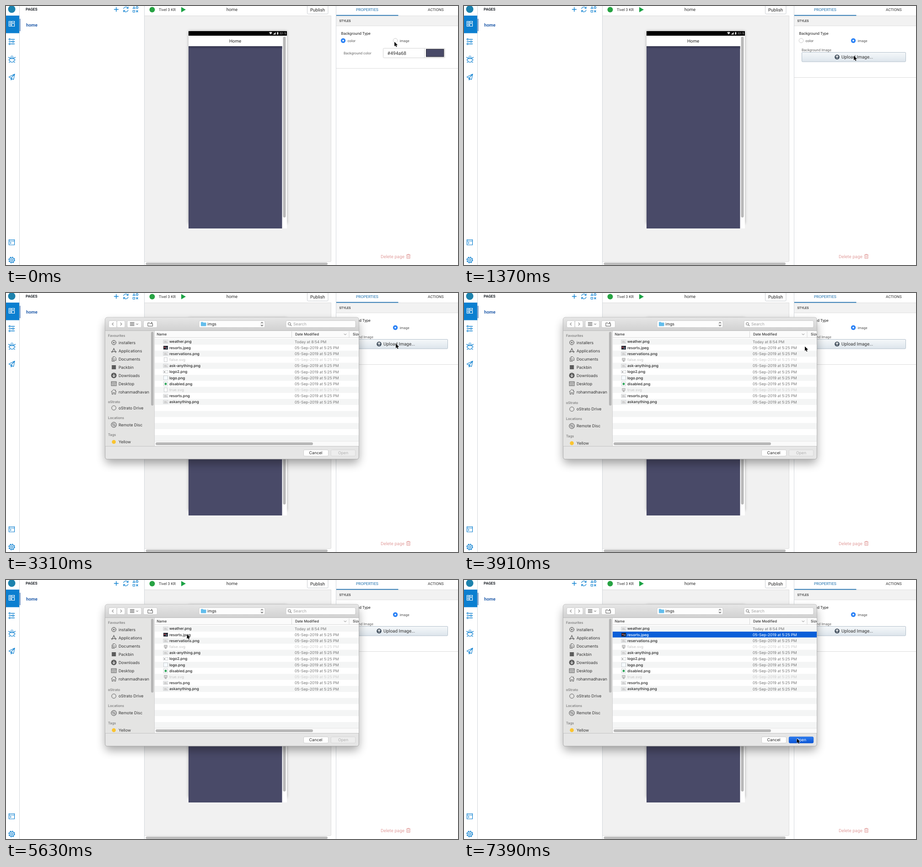
Recreate the animation shown at these times as an HTML page. Size 988 px wide and 567 px high, loop 8 s.

```html
<!DOCTYPE html>
<html lang="en">
<head>
<meta charset="utf-8">
<title>Page background image</title>
<style>
html, body { margin: 0; width: 100%; height: 100%; overflow: hidden; background: #fff; }
svg { display: block; width: 100%; height: 100%; }
text { white-space: pre; text-rendering: geometricPrecision; }
#app { font-family: Roboto, "Open Sans", sans-serif; }
#dialog { font-family: Inter, Roboto, sans-serif; }
</style>
</head>
<body>
<svg id="stage" viewBox="0 0 988 567"></svg>
<script>
const LOOP = 8000;
const BLUE = '#0b7fd0';

// Shape helpers; text takes the vertical centre of its capitals.
const text = (x, cy, s, size, fill, more = '') =>
  `<text x="${x}" y="${cy + size * 0.36}" font-size="${size}" fill="${fill}" ${more}>${s}</text>`;
const box = (x, y, w, h, fill, more = '') =>
  `<rect x="${x}" y="${y}" width="${w}" height="${h}" fill="${fill}" ${more}/>`;
const disc = (x, y, r, fill, more = '') =>
  `<circle cx="${x}" cy="${y}" r="${r}" fill="${fill}" ${more}/>`;
const line = (d, stroke, width = 1, more = '') =>
  `<path d="${d}" fill="none" stroke="${stroke}" stroke-width="${width}" ${more}/>`;
const group = (id, body, more = '') => `<g id="${id}" ${more}>${body}</g>`;
const MID = 'text-anchor="middle"';
const BOLD = 'font-weight="700"';
const MEDIUM = 'font-weight="500"';

const defs = `<defs>
  <filter id="soft" x="-20%" y="-20%" width="140%" height="140%"><feGaussianBlur stdDeviation="3"/></filter>
  <filter id="wide" x="-20%" y="-20%" width="140%" height="150%"><feGaussianBlur stdDeviation="10"/></filter>
  ${[['bar', '#e6e6e6', '#d1d1d1'], ['plain', '#ffffff', '#f3f3f3'], ['hover', '#f5f8fa', '#dde5ec'],
     ['drop', '#33344d', '#494a68'], ['ready', '#4d9bfa', '#1068f5'], ['down', '#2e7df0', '#0a53d4']]
    .map(([id, a, b]) => `<linearGradient id="${id}" x2="0" y2="1">
      <stop stop-color="${a}"/><stop offset="1" stop-color="${b}"/></linearGradient>`).join('')}
  <clipPath id="list"><rect x="325" y="83" width="446" height="252"/></clipPath>
  <clipPath id="side"><rect x="217" y="83" width="108" height="252"/></clipPath>
</defs>`;

function sidebar() {
  return box(0, 0, 988, 567, '#fff')
    + line('M29.5 0V567M302.5 0V567', '#d3d8dc')
    + disc(12.5, 7, 8, '#1c82ad')
    + box(0, 21, 29, 38.5, BLUE)
    + line('M6.5 33.5h4v11h-4zM12.5 33.5h6v3h-6zM12.5 38.5h6v6h-6zM6.5 37h4M6.5 41h4', '#fff', 1.2)
    + line('M11 73h8M6 78h7.5M17.5 78h1.5M11 83h8', BLUE, 1.3)
    + [[8, 73], [15.5, 78], [8, 83]].map(([x, y]) => disc(x, y, 1.7, 'none', `stroke="${BLUE}" stroke-width="1.2"`)).join('')
    + disc(13, 118, 5.2, 'none', `stroke="${BLUE}" stroke-width="1.2"`)
    + line('M8 113q5 5 10 0M5 112l3 2M21 112l-3 2M5 118h2.5M18.5 118H21M6.5 124l2.5-2M19.5 124l-2.5-2M10 111q3-3 6 0', BLUE, 1.1)
    + line('M6 155.5 19 149 16.5 161 11 158 19 149M6 155.5 11 158v4l2.4-2.7', BLUE, 1.2, 'stroke-linejoin="round"')
    + line('M6.5 511.5h12v11.5h-12zM6.5 514.5h12M9 517l2 1.7-2 1.7', BLUE, 1.2)
    + disc(12.5, 556, 2.3, 'none', `stroke="${BLUE}" stroke-width="1.2"`)
    + disc(12.5, 556, 5.3, 'none', `stroke="${BLUE}" stroke-width="1.2"`)
    + disc(12.5, 556, 6.4, 'none', `stroke="${BLUE}" stroke-width="1.5" stroke-dasharray="2.5 2.53"`)
    + text(43, 7.5, 'PAGES', 8.3, '#20252b', BOLD)
    + box(30, 28, 1.3, 27, '#2a62ad')
    + text(44, 41.8, 'home', 9.8, '#2a62ad', BOLD)
    + line('M241 2.5v10M236 7.5h10', BLUE, 1.4)
    + line('M257 6.5a5.2 5.2 0 0 1 9.6-1.8M267 8.5a5.2 5.2 0 0 1-9.6 1.8M267 1.5v3.6h-3.6M257 13.5V9.900h3.6', BLUE, 1.2)
    + line('M277.500 5.500l2.300-4 2.300 4zM277.500 9.500h4v4h-4zM284.500 9.500l4 4M288.500 9.500l-4 4', BLUE, 1.1)
    + disc(286.5, 3.500, 2.1, 'none', `stroke="${BLUE}" stroke-width="1.1"`);
}

function canvasArea() {
  return box(303, 21, 407, 538, '#f1f1f1')
    + line('M303 21.500H710M710.500 21V559M303 559.500H710', '#dcdcdc')
    + box(305.5, 561.5, 397.5, 5.5, '#bdbdbd', 'rx="2.7"')
    + disc(319.5, 8, 6, '#27a343')
    + text(334, 7.5, 'Tivel 3 KR', 8.4, '#333')
    + '<path d="M383 2.200 393 8 383 13.800z" fill="#1ca345"/>'
    + text(494, 8, 'home', 9.7, '#333', MID)
    + box(658.5, -5, 45.5, 22.5, '#fff', 'rx="2" stroke="#c9cdd1"')
    + text(681, 8, 'Publish', 9.75, '#222', MID)
    + box(399, 55, 215, 421, '#000', 'opacity=".28" filter="url(#soft)"')
    + box(399, 65, 215, 422, '#fff')
    + box(399, 55, 215, 10, '#000')
    + box(399, 88, 204.500, 399, '#494a68')
    + box(399, 88, 204.500, 6, 'url(#drop)')
    + box(605.500, 67, 6, 396, '#b8b8b8', 'rx="3"')
    + text(501, 76.5, 'Home', 9.7, '#222', MID)
    + '<path d="M575 58q3.500-2.600 7 0l-3.500 4.500zM589.500 57v5.500h-6zM592.300 57.500h.8v-.8h1.400v.8h.8v5h-3z" fill="#ddd"/>'
    + text(598, 60, '22:5', 6, '#eee', 'font-family="DejaVu Sans Mono, monospace"');
}

const radio = (x, on) => on
  ? disc(x, 75.7, 5.2, '#2b82f6') + disc(x, 75.7, 1.8, '#fff')
  : disc(x, 75.7, 4.8, '#fff', 'stroke="#c4c4c4" stroke-width=".9"');

function properties() {
  const colorForm = radio(737, true) + radio(851, false)
    + text(738, 102.800, 'Background color', 7.75, '#666')
    + box(824.500, 92.500, 135, 21, '#fff', 'rx="2" stroke="#d2d2d2"')
    + line('M914.500 93v20', '#d8d8d8')
    + text(833.5, 102.8, '#494a68', 10.45, '#333')
    + box(918.500, 94.500, 38.500, 16.500, '#494a68', 'stroke="#2a2a35"')
    + line('M722 136.500H988', '#dcdcdc');
  const imageForm = radio(737, false) + radio(851, true)
    + text(738, 96.500, 'Background Image', 7.77, '#666')
    + box(738.500, 101.500, 227, 20.500, 'url(#plain)', 'id="upload" rx="1.5" stroke="#cfd3d6"')
    + disc(815.5, 111.700, 5.400, '#4b5866')
    + line('M815.500 114.900v-6M812.900 111.200l2.600-2.600 2.600 2.600', '#fff', 1.3)
    + text(825, 111.800, 'Upload Image...', 9.93, '#333')
    + line('M722 156.500H988', '#dcdcdc');
  return line('M721.500 0V567', '#d3d8dc')
    + box(722, 22, 266, 21.500, '#f2f2f2')
    + line('M722 21.500H988M722 43.500H988', '#e0e0e0')
    + box(722, 19.700, 135.500, 1.700, '#1b6fae')
    + text(765, 7.500, 'PROPERTIES', 8.5, '#1b6fae')
    + text(922, 7.500, 'ACTIONS', 8.4, '#333')
    + text(728.500, 32.500, 'STYLES', 7.1, '#333', MEDIUM)
    + text(732.500, 60.300, 'Background Type', 8.4, '#222')
    + text(746.500, 75.900, 'color', 7.8, '#555')
    + text(860.500, 75.900, 'image', 7.7, '#555')
    + text(819, 548.300, 'Delete page', 9.9, '#e2a09f')
    + line('M875 545h9M877.500 545v-1.500h4v1.500M876 545v7.500h7v-7.500M878.200 547v4M880.800 547v4', '#de9290', .9)
    + group('colorForm', colorForm) + group('imageForm', imageForm);
}

const DARK = '#5c5c5c';
const places = [
  ['installers', disc(0, 0, 4.2, 'none', `stroke="${DARK}"`) + disc(0, 0, 5.300, 'none', `stroke="${DARK}" stroke-dasharray="1.200 1.200"`) + disc(0, 0, 1.500, DARK)],
  ['Applications', line('M-4.500 4.500 0-5 4.500 4.500M-6 1.800H6', DARK, 1.2)],
  ['Documents', line('M-4-3v8h6M-1.800-5H2l3 3v5h-6.800zM0 0h3', DARK)],
  ['Packbin', box(-4.5, -4.5, 9, 9, DARK)],
  ['Downloads', disc(0, 0, 6, DARK) + line('M0-3.500v6M-2.700 0 0 2.900 2.700 0', '#e4e4e4', 1.3)],
  ['Desktop', box(-5.5, -4.5, 11, 9, 'none', `stroke="${DARK}"`) + line('M-5.500-2.500h11M-4 2.500h8M-4.500 0h9', DARK, .9)],
  ['rohanmadhavan', line('M-6 0 0-5.500 6 0M-4-1v6.200h2.500V1.500h3v3.700H4V-1M3.500-2.500v-2.500', DARK)],
];
const place = ([name, icon], y) => `<g transform="translate(235.700 ${y})">${icon}</g>` + text(246, y, name, 8.8, '#333');
const heading = (y, s) => text(223, y, s, 7.55, '#777', MEDIUM);

function sidePane() {
  const lower = heading(238, 'oStrato')
    + place(['oStrato Drive', disc(0, 0, 4.800, 'none', `stroke="${DARK}"`)], 251.500)
    + heading(273, 'Locations')
    + place(['Remote Disc', disc(0, 0, 5.800, '#c9c9c9', `stroke="${DARK}"`) + disc(0, 0, 1.700, '#eee', `stroke="${DARK}" stroke-width=".8"`)
      + line('M-4-3 -1-1M4 3 1 1', DARK, .8)], 288.500)
    + heading(310.500, 'Tags')
    + place(['Yellow', disc(0, 0, 4.300, '#fac42f')], 326);
  return box(217, 83, 107.500, 252, '#e4e4e3')
    + `<g clip-path="url(#side)">${heading(93, 'Favourites')}`
    + places.map((p, i) => place(p, 108.500 + 18 * i)).join('')
    + group('lower', lower) + '</g>'
    + box(317, 85, 5.500, 161.500, '#b5b5b5', 'rx="2.750"')
    + line('M324.500 83V335', '#d0d0d0');
}

const files = ['weather.png', 'resorts.jpeg', 'reservations.png', 'false.svg', 'ask-anything.png', 'logo2.png',
  'logo.png', 'disabled.png', 'true.svg', 'resorts.png', 'askanything.png'];
const ROW = 13.2, TOP = 99.9, PICKED = 1;

function fileIcon(name, y) {
  const frame = (x, w, h, fill) => box(x, y - h / 2, w, h, fill, 'stroke="#b9bec2" stroke-width=".7"');
  if (name.endsWith('.svg'))
    return `<g class="page">${frame(345.5, 7, 9, '#fbfbfb')}</g>`
      + `<g class="badge">${box(345, y - 4, 8, 6, '#c4c4c4', 'rx="1"') + box(347, y + 1, 4, 3.500, '#b9b9b9') + line(`M346.500 ${y - 1}h5`, '#eee')}</g>`;
  if (name === 'resorts.jpeg')
    return box(344, y - 4, 10, 8, '#20242f') + box(345, y - 1.500, 4, 2, '#b8474f') + box(349, y, 4, 1.500, '#8fa5c0');
  if (name === 'disabled.png') return frame(344.500, 9, 9, '#fff') + disc(349, y, 2.500, '#2fa55a');
  if (name === 'logo.png') return frame(344.500, 9, 9, '#f6fafd');
  if (name === 'logo2.png') return frame(344, 10, 6, '#fff') + box(345.500, y - .5, 2.500, 1.500, '#555');
  return frame(344, 10, 7, '#f4f4f4') + line(`M345.500 ${y - .8}h6M345.500 ${y + 1.500}h7`, '#999', .9);
}

function fileList() {
  let out = box(325, 83, 446, 252, '#fff');
  for (let i = 0; i < 17; i += 2) out += box(325, TOP + i * ROW, 446, ROW, '#f4f5f5');
  out += box(325, 113, 446, 12.800, '#0a5fd8', 'id="pick"');
  files.forEach((name, i) => {
    const y = 106.5 + i * ROW, off = name.endsWith('.svg');
    const id = i === PICKED ? 'class="picked"' : '';
    out += fileIcon(name, y)
      + `<g ${id} fill="${off ? '#c9c9c9' : '#222'}">${text(357, y, name, 8.15, 'inherit', MEDIUM)}</g>`
      + `<g ${id} fill="${off ? '#cdcdcd' : '#777'}">${text(631, y, i ? '05-Sep-2019 at 5:25 PM' : 'Today at 8:54 PM', 8.350, 'inherit')}</g>`;
  });
  out = out.replaceAll('fill="inherit"', '');
  out += box(325, 83, 446, 14.500, '#fbfbfb')
    + line('M325 97.500H771M624.500 84V97M750 84V97', '#d8d8d8')
    + text(329.500, 90.200, 'Name', 7.750, '#333', MEDIUM)
    + text(632, 90.200, 'Date Modified', 7.750, '#333', MEDIUM)
    + text(758, 90.200, 'Size', 7.750, '#333', MEDIUM)
    + line('M738.800 89.200l2.600 2.600 2.600-2.600', '#777')
    + box(325, 324.500, 446, 10.500, '#fafafa') + line('M325 324.500H771', '#e6e6e6')
    + box(327, 327, 344, 6, '#b7b7b7', 'rx="3"');
  return `<g clip-path="url(#list)">${out}</g>`;
}

function dialog() {
  const key = (x, w) => box(x, 60.500, w, 15, '#fdfdfd', 'rx="2.500" stroke="#c6c6c6" stroke-width=".8"');
  return box(217, 64, 554, 309, '#000', 'rx="8" opacity=".34" filter="url(#wide)"')
    + box(216.800, 53.300, 554.400, 310.500, '#e6e6e6', 'rx="4.500" stroke="#9f9f9f" stroke-width=".8"')
    + '<path d="M217 82.500V58q0-4.500 4.500-4.500h545q4.500 0 4.500 4.500v24.500z" fill="url(#bar)"/>'
    + line('M217 82.500H771', '#bcbcbc')
    + key(224.500, 17.500) + key(242.500, 17.500) + key(265, 31) + key(300.500, 30) + key(422, 144) + key(612, 152)
    + line('M235 65l-3 3 3 3M250 65l3 3-3 3', '#8a8a8a', 1.1)
    + line('M271 64.500h9.500M271 66.800h9.500M271 69.100h9.500M271 71.400h9.500M284.500 67l2.200 2.200 2.200-2.200', '#555')
    + line('M310 65.500h4l1 1.500h5.500v5.500H310zM318.500 63.500v3M317 65h3', '#555')
    + '<path d="M426 64.500q0-1 1-1h3.500l1 1.300h5q1 0 1 1v5.700q0 1-1 1H427q-1 0-1-1z" fill="#62bdec"/>'
    + text(440, 68.300, 'imgs', 8.850, '#222')
    + line('M557.200 66.500l2.300-2.500 2.300 2.500M557.200 69.700l2.300 2.500 2.300-2.500', '#444', 1.1)
    + disc(619.500, 67.500, 2.800, 'none', 'stroke="#666"') + line('M621.600 69.600l2.500 2.500', '#666', 1.1)
    + text(628, 68.300, 'Search', 8.700, '#a3a3a3')
    + sidePane() + fileList()
    + line('M217 335.500H771', '#c4c4c4')
    + box(650.500, 343.300, 54, 13.700, '#fff', 'rx="2.500" stroke="#c6c6c6" stroke-width=".8"')
    + text(677, 350.300, 'Cancel', 8.800, '#222', MID)
    + box(710.300, 343.300, 53.500, 13.700, '#ededed', 'id="open" rx="2.500" stroke="#d2d2d2" stroke-width=".8"')
    + `<g id="openText">${text(737, 350.300, 'Open', 8.700, 'inherit', MID).replace('fill="inherit"', '')}</g>`;
}

const pointer = '<path id="pointer" d="M0 0V9.800L2.300 7.700 3.800 11.200 5.500 10.500 4 7.100H7.100Z" fill="#000" stroke="#fff" stroke-width=".8" paint-order="stroke"/>';

const stage = document.getElementById('stage');
stage.innerHTML = defs + group('app', sidebar() + canvasArea() + properties()) + group('dialog', dialog()) + pointer;

const $ = id => document.getElementById(id);
const all = name => stage.querySelectorAll('.' + name);
const show = (el, on) => el.setAttribute('display', on ? 'inline' : 'none');

// The pointer holds each place until the next: time, x, y.
const track = [
  [0, 849, 78.5], [120, 850.5, 78], [300, 851, 77.500], [530, 852, 75],
  [1010, 852, 78], [1130, 852, 88], [1250, 852, 101], [1370, 852, 109], [1490, 852, 112.500], [2530, 852, 111],
  [3910, 745, 117], [4030, 570, 129], [4140, 492, 137],
  [4620, 487.5, 134], [4740, 482, 130.500], [4860, 477, 127], [4980, 475, 126],
  [5130, 456, 123], [5250, 425, 119.500], [5370, 402, 117.500], [5480, 396, 118], [5630, 395.500, 119],
  [6230, 562.500, 220], [6370, 647, 299], [6490, 685.500, 335], [6640, 717, 344], [6760, 727.500, 347],
];

function update(t) {
  const [, x, y] = track.findLast(k => k[0] <= t);
  $('pointer').setAttribute('transform', `translate(${x} ${y})`);

  show($('colorForm'), t < 530);
  show($('imageForm'), t >= 530);
  $('upload').setAttribute('fill', t >= 1250 ? 'url(#hover)' : 'url(#plain)');
  $('upload').setAttribute('stroke', t >= 1250 ? '#b3c0cb' : '#cfd3d6');

  const settled = t >= 3430, picked = t >= 5990;
  show($('dialog'), t >= 3310);
  $('lower').setAttribute('transform', `translate(0 ${settled ? 2.700 : 0})`);
  all('page').forEach(el => show(el, !settled));
  all('badge').forEach(el => show(el, settled));

  show($('pick'), picked);
  all('picked').forEach((el, i) => el.setAttribute('fill', picked ? '#fff' : i ? '#777' : '#222'));
  $('open').setAttribute('fill', !picked ? '#ededed' : t < 7390 ? 'url(#ready)' : 'url(#down)');
  $('open').setAttribute('stroke', picked ? '#1a62d8' : '#d2d2d2');
  $('openText').setAttribute('fill', picked ? '#fff' : '#b0b0b0');
}

const start = performance.now();
function tick() {
  update((performance.now() - start) % LOOP);
  requestAnimationFrame(tick);
}
tick();
</script>
</body>
</html>
```
